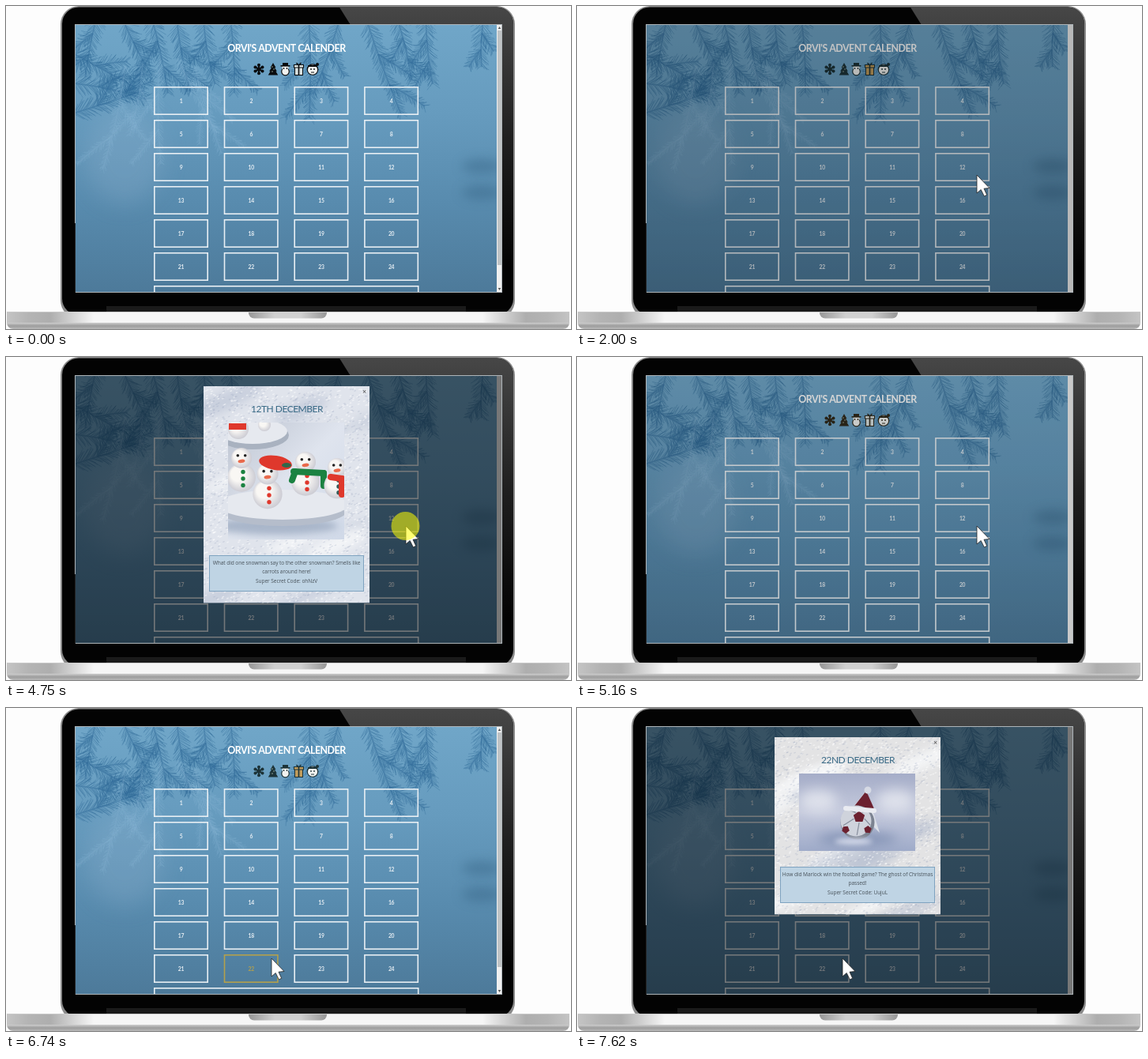
Animation of 715 by 409 pixels, one loop 8 s. Source, as an HTML page with a canvas:

```html
<!DOCTYPE html>
<html lang="en">
<head>
<meta charset="utf-8">
<title>Advent calendar</title>
<style>
  html, body { margin: 0; width: 100%; height: 100%; overflow: hidden; background: #fdfdfd; }
  canvas { display: block; }
</style>
</head>
<body>
<canvas id="stage" width="715" height="409"></canvas>
<script>
const W = 715, H = 409, LOOP = 8000;
const SCREEN = { x: 88, y: 24, w: 539, h: 338 };
const MOVES = [
  { start: 430, end: 1260, x: 507, y: 220 },
  { start: 1260, end: 1600, x: 506, y: 214 },
  { start: 5570, end: 6400, x: 339, y: 309 },
  { start: 6400, end: 6740, x: 336, y: 317 }
];
const VIEWS = [
  {
    open: 1800, close: 4750, title: '12TH DECEMBER', photo: sweetsPhoto, photoHeight: 148, snow: '#e0e4ec',
    lines: ['What did one snowman say to the other snowman? Smells like', 'carrots around here!', 'Super Secret Code: ohNzV']
  },
  {
    open: 7000, close: Infinity, title: '22ND DECEMBER', photo: ballPhoto, photoHeight: 98, snow: '#e3e3e4',
    lines: ['How did Marlock win the football game? The ghost of Christmas', 'passed!', 'Super Secret Code: UujuL']
  }
];

let g = document.getElementById('stage').getContext('2d');
let seed = 7;
const rnd = (low = 0, high = 1) => low + (high - low) * ((seed = seed * 16807 % 2147483647) / 2147483647);
const ramp = (t, start, span) => Math.min(1, Math.max(0, (t - start) / span));
const smooth = p => p * p * (3 - 2 * p);
const repeat = (count, paint) => { for (let i = 0; i < count; i++) paint(i); };

// Paints once into an offscreen canvas with the shared helpers.
function layer(paint) {
  const canvas = document.createElement('canvas');
  canvas.width = W;
  canvas.height = H;
  const previous = g;
  g = canvas.getContext('2d');
  paint();
  g = previous;
  return canvas;
}

// Evenly spaced colour stops.
function gradient(x0, y0, x1, y1, ...colors) {
  const fill = g.createLinearGradient(x0, y0, x1, y1);
  colors.forEach((color, i) => fill.addColorStop(i / (colors.length - 1), color));
  return fill;
}

function rect(x, y, w, h, color) {
  g.fillStyle = color;
  g.fillRect(x, y, w, h);
}

function rounded(x, y, w, h, radii, color) {
  g.beginPath();
  g.roundRect(x, y, w, h, radii);
  g.fillStyle = color;
  g.fill();
}

function oval(x, y, rx, ry, color, turn = 0) {
  g.beginPath();
  g.ellipse(x, y, rx, ry, turn, 0, 7);
  g.fillStyle = color;
  g.fill();
}

const dot = (x, y, r, color) => oval(x, y, r, r, color);

function ball(x, y, r) {
  const fill = g.createRadialGradient(x - r / 4, y - r / 4, r / 2, x, y, r * 1.1);
  fill.addColorStop(0, '#f9f7f4');
  fill.addColorStop(1, '#c6c6cf');
  dot(x, y, r, fill);
}

function poly(points, color) {
  g.beginPath();
  points.forEach(([x, y]) => g.lineTo(x, y));
  g.closePath();
  g.fillStyle = color;
  g.fill();
}

function ngon(x, y, r, sides, color, turn = -Math.PI / 2) {
  const corner = (_, i) => turn + i * 2 * Math.PI / sides;
  poly(Array.from({ length: sides }, corner).map(a => [x + r * Math.cos(a), y + r * Math.sin(a)]), color);
}

function line(x0, y0, x1, y1, color, width) {
  g.beginPath();
  g.moveTo(x0, y0);
  g.lineTo(x1, y1);
  g.strokeStyle = color;
  g.lineWidth = width;
  g.stroke();
}

function text(string, x, y, font, color, spacing = 0) {
  g.font = font;
  g.fillStyle = color;
  g.letterSpacing = spacing + 'px';
  g.textAlign = 'center';
  g.textBaseline = 'middle';
  g.fillText(string, x, y);
}

function soft(x, y, rx, ry, color, blur, turn) {
  g.filter = `blur(${blur}px)`;
  oval(x, y, rx, ry, color, turn);
  g.filter = 'none';
}

function clipped(x, y, w, h, paint, radii = 0) {
  g.save();
  g.beginPath();
  g.roundRect(x, y, w, h, radii);
  g.clip();
  paint();
  g.restore();
}

// ---- wallpaper ----
function twig(x, y, angle, length, needle, color, forks) {
  const step = 1.7, bend = rnd(-.25, .25);
  for (let s = 0; s < length; s += step) {
    const a = angle + bend * s / length;
    for (const side of [-1, 1]) {
      const spread = a + side * rnd(.5, 1);
      const size = needle * rnd(.6, 1.1) * (1 - .4 * s / length);
      line(x, y, x + Math.cos(spread) * size, y + Math.sin(spread) * size, color, .9);
    }
    if (forks && s > 5 && s % (length / forks) < step)
      twig(x, y, a + (rnd() < .5 ? -.7 : .7), length * .42, needle * .8, color, 0);
    const nextX = x + Math.cos(a) * step, nextY = y + Math.sin(a) * step;
    line(x, y, nextX, nextY, color, 1.6);
    x = nextX;
    y = nextY;
  }
}

function boughs(count, left, right, top, length, color, needle) {
  repeat(count, i => twig(left + (right - left) * (i + .5) / count, top + rnd(-8, 8),
    rnd(1.1, 1.9), length * rnd(.75, 1.2), needle, color, 3));
}

const wallpaper = layer(() => clipped(SCREEN.x, SCREEN.y, SCREEN.w, SCREEN.h, () => {
  const dark = 'rgba(48,106,152,.4)', pale = 'rgba(140,182,212,.22)';
  rect(88, 24, 540, 338, gradient(0, 24, 0, 362, '#70a6c8', '#669bbe', '#588bae', '#4d7a9a'));
  soft(150, 190, 50, 60, 'rgba(150,185,210,.25)', 14);
  repeat(2, i => soft(602, 203 + i * 33, 25, 9, 'rgba(50,95,130,.42)', 7));
  boughs(6, 100, 300, 15, 95, dark, 18);
  boughs(5, 365, 550, 15, 105, dark, 18);
  boughs(1, 590, 620, 12, 70, dark, 19);
  repeat(3, i => twig(85, 60 + i * 38, .5 - i * .4, 95, 20, dark, 3));
  boughs(5, 140, 250, 70, 120, pale, 12);
}));

// ---- laptop ----
const laptop = layer(() => {
  rect(0, 0, W, H, '#fdfdfd');
  rounded(69, 0, 575, 396, 23, '#8a8a8a');
  rounded(71, 1.5, 571, 390, 21, '#030303');
  clipped(71, 1.5, 571, 390, () => poly([[421, 0], [436, 24], [628, 24], [628, 362], [644, 362], [644, 0]],
    gradient(0, 0, 0, 330, '#474747', '#202020', '#030303')), 21);
  rect(127, 380, 455, 7, '#1a1a1a');
  rect(87, 23, 541, 340, '#aeb5b9');
  rect(87, 275, 1, 88, '#222');
  rounded(1, 387, 712, 22, [2, 2, 18, 18], '#f6f6f6');
  for (const side of [0, 1])
    rect(side ? 713 : 1, 388, side ? -110 : 110, 14, gradient(side ? 713 : 1, 0, side ? 603 : 111, 0,
      '#c4c4c4', '#b4b4b4', '#aeaeae', '#d2d2d2', '#f6f6f6'));
  rounded(1, 401, 712, 8, [0, 0, 40, 40], gradient(0, 401, 0, 409, '#cfcfcf', '#9c9c9c', '#b9b9b9'));
  rect(1, 387, 712, 1, '#c9c9c9');
  rounded(307, 388, 99, 7.5, [0, 0, 7, 7], gradient(307, 0, 406, 0, '#979797', '#d0d0d0', '#d0d0d0', '#979797'));
});

// ---- pop-up cards ----
function snowman(x, y, size, buttons) {
  ball(x, y + size * 1.9, size * 1.38);
  ball(x, y, size);
  for (const side of [-1, 1]) dot(x + side * size * .36, y - size * .25, 1.8, '#222');
  oval(x, y + size * .3, 4.5, 2.2, '#e96a4b', -.15);
  repeat(3, i => dot(x + 2, y + size * (1.35 + i * .65), 2.7, buttons));
}

function scarf(x, y, w, tail, color) {
  g.lineCap = 'round';
  line(x - w / 2, y, x + w / 2, y + 2, color, 8);
  line(x + w / 2, y + 2, x + w / 2, y + tail, color, 8);
}

function sweetsPhoto() {
  const red = '#df382c', green = '#1b8241';
  rect(281, 83, 147, 148, gradient(281, 83, 428, 231, '#bcc3d0', '#dfe4ee', '#d0d9e8'));
  oval(312, 99, 46, 18, '#a9b2c0');
  oval(312, 94, 44, 16, '#e6e9ef');
  ball(294, 91, 13);
  rect(282, 84, 22, 8, red);
  ball(327, 86, 8);
  soft(340, 214, 80, 11, '#a9b6ca', 4);
  oval(350, 194, 82, 20, '#b5bdcb');
  oval(350, 187, 83, 19, '#e6e9ef');
  snowman(298, 128, 13, green);
  snowman(379, 133, 13, red);
  scarf(383, 145, 38, 18, green);
  line(366, 145, 362, 156, green, 8);
  snowman(419, 140, 12, '#345a57');
  scarf(418, 152, 14, 22, red);
  snowman(331, 148, 13.5, red);
  oval(341, 134, 21, 9, red, .15);
  oval(355, 137, 6, 3, '#2f684a');
}

function ballPhoto() {
  const maroon = '#6c2130';
  rect(281, 83, 147, 98, gradient(0, 83, 0, 181, '#a5adc8', '#c5cadd', '#9fabc9'));
  for (const side of [-1, 1]) soft(354 + side * 49, 118, 24, 14, '#dee1eb', 8);
  soft(355, 166, 50, 9, '#8796b7', 7);
  poly([[366, 104], [350, 125], [383, 158]], '#dce0e8');
  poly([[366, 105], [348, 128], [378, 132]], maroon);
  dot(368, 104, 4.5, '#d6dae4');
  dot(355, 145, 21.5, '#7c8391');
  dot(353, 143, 19.5, '#cfd3dc');
  ngon(357, 138, 7.5, 5, maroon);
  for (const side of [-1, 1]) ngon(354 + side * 14, 154, 5, 5, maroon, side);
  repeat(5, i => {
    const a = i * 1.257 + .3;
    line(357 + 7 * Math.cos(a), 138 + 7 * Math.sin(a), 354 + 18 * Math.cos(a), 143 + 18 * Math.sin(a), '#858c9b', 1.2);
  });
  g.lineCap = 'round';
  line(340, 127, 376, 130, '#e9ebf1', 6);
  soft(350, 169, 24, 4, '#d5daea', 3);
}

function card({ title, photo, photoHeight, lines, snow }) {
  const height = photoHeight + 126.5, boxY = 103 + photoHeight;
  const anywhere = () => [rnd(250, 460), rnd(37, 37 + height)];
  clipped(250, 37, 210, height, () => {
    rect(250, 37, 210, height, snow);
    repeat(14, i => soft(...anywhere(), rnd(30, 60), rnd(5, 12), i % 2 ? 'rgba(178,188,208,.5)' : 'rgba(248,249,251,.8)', 6, -.4));
    repeat(2600, i => oval(...anywhere(), 1.5, .7, i % 2 ? 'rgba(145,157,182,.25)' : 'rgba(255,255,255,.5)', -.4));
  });
  text('×', 453.5, 45, '9px "Open Sans", sans-serif', '#444');
  text(title, 355.5, 66, '12px Lato, sans-serif', '#386985', -.5);
  clipped(281, 83, 147, photoHeight, photo);
  rect(257, boxY, 196, 46, '#7fa3c0');
  rect(258, boxY + 1, 194, 44, '#bfd4e4');
  lines.forEach((string, i) => text(string, 355, boxY + 10 + i * 11.5, '6.6px "Open Sans", sans-serif', '#48525a', -.08));
}

VIEWS.forEach(view => view.card = layer(() => card(view)));

// ---- page ----
function icons(ink, gift) {
  const white = '#f1f3f0';
  const face = (x, y) => { for (const side of [-1, 1]) dot(x + side * 2, y, .9, ink); };
  repeat(6, i => {
    const c = Math.cos(i * Math.PI / 3 + .52), s = Math.sin(i * Math.PI / 3 + .52);
    line(320, 80, 320 + 6.5 * c, 80 + 6.5 * s, ink, 2.2);
    dot(320 + 5.2 * c, 80 + 5.2 * s, 2, ink);
  });
  repeat(3, i => ngon(338, 76 + i * 4, 4 + i * 1.6, 3, ink));
  repeat(3, i => dot(337 + i % 2 * 2, 77 + i * 3, .7, '#b9c9b8'));
  dot(353.5, 83, 5.4, ink);
  dot(353.5, 83, 4.2, white);
  dot(353.5, 78, 4, white);
  rect(350, 72, 7, 4, ink);
  rect(347.5, 75, 12, 1.6, ink);
  face(353.5, 79);
  rect(364, 74, 13, 4.5, ink);
  rect(365, 77, 11, 11, ink);
  rect(365, 75, 11, 2.5, gift);
  rect(366, 78.5, 9, 8.5, gift);
  rect(369.7, 75, 1.6, 12, ink);
  for (const side of [-1, 1]) line(370.5, 75, 370.5 + side * 3, 72, ink, 1.5);
  dot(388, 80.5, 7.3, ink);
  dot(388, 80.7, 6.1, white);
  rect(382, 75, 12, 2, ink);
  dot(394, 74, 2, ink);
  face(388, 80);
  line(386, 84, 390, 84, ink, 1);
}

function button(x, y, w, label, over) {
  g.strokeStyle = over ? '#b3a04c' : '#e8eff4';
  g.lineWidth = 1.6;
  g.strokeRect(x + .8, y + .8, w - 1.6, 34.4);
  text(label, x + w / 2, y + 19, 'bold 6.8px Lato, sans-serif', g.strokeStyle, -.3);
}

function page(t, pointer, blocked) {
  const reopened = t > 4000;
  const tanned = t > 5230 || (t > 1930 && !reopened);
  const inside = (x, y) => pointer && !blocked
    && Math.abs(pointer.x - x - 34.5) <= 34.5 && Math.abs(pointer.y - y - 18) <= 18;
  g.drawImage(wallpaper, 0, 0);
  text("ORVI'S ADVENT CALENDER", 355, 54, 'bold 12.4px Lato, sans-serif', '#fff', -.5);
  icons(tanned ? '#1d3338' : reopened ? '#302a1c' : '#0a0c0e', tanned ? '#c09c5c' : '#d9e1e0');
  repeat(24, i => {
    const x = 187 + (i % 4) * 88.7, y = 102 + Math.floor(i / 4) * 42;
    button(x, y, 69, i + 1, inside(x, y));
  });
  button(187, 354, 335.5, '', false);
  rect(621, 24, 7, 338, '#f0f0f0');
  if (blocked) return;
  rect(622, 31, 5, 297, '#bfc3c5');
  ngon(624.5, 28, 2, 3, '#555');
  ngon(624.5, 358, 2, 3, '#555', Math.PI / 2);
}

function pointerAt(t) {
  if (t < 500) return null;
  let at = { x: 531, y: 412 };
  for (const { start, end, x, y } of MOVES) {
    const p = smooth(ramp(t, start, end - start));
    at = { x: at.x + (x - at.x) * p, y: at.y + (y - at.y) * p };
  }
  return at;
}

function drawPointer({ x, y }) {
  const arrow = [[0, 0], [0, 23], [5.2, 18.5], [9.3, 26.8], [12.7, 25.3], [9, 17.2], [16, 16.5]];
  poly(arrow.map(([dx, dy]) => [x + dx, y + dy]), '#fff');
  g.strokeStyle = '#222';
  g.lineWidth = .8;
  g.stroke();
}

function draw(t) {
  const pointer = pointerAt(t);
  const dim = Math.max(...VIEWS.map(v => .5 * ramp(t, v.open + 130, 150) * (1 - ramp(t, v.close + 310, 150))));
  g.drawImage(laptop, 0, 0);
  clipped(SCREEN.x, SCREEN.y, SCREEN.w, SCREEN.h, () => {
    page(t, pointer, dim > 0);
    rect(88, 24, 540, 338, `rgba(0,0,0,${dim})`);
    for (const { open, close, card } of VIEWS) {
      const rise = ramp(t, open + 280, 300), leave = ramp(t, close + 130, 300);
      g.globalAlpha = ramp(t, open + 280, 150) * (1 - ramp(t, close + 130, 150));
      if (g.globalAlpha) g.drawImage(card, 0, -20 * ((1 - rise) ** 2 + 1 - (1 - leave) ** 2));
      g.globalAlpha = 1;
    }
  });
  if (!pointer) return;
  drawPointer(pointer);
  if (VIEWS.some(v => [v.open, v.close].some(click => t >= click && t < click + 130)))
    dot(pointer.x - .5, pointer.y, 18, 'rgba(255,255,0,.55)');
}

const start = performance.now();
function tick() {
  draw((performance.now() - start) % LOOP);
  requestAnimationFrame(tick);
}
tick();
</script>
</body>
</html>
```
